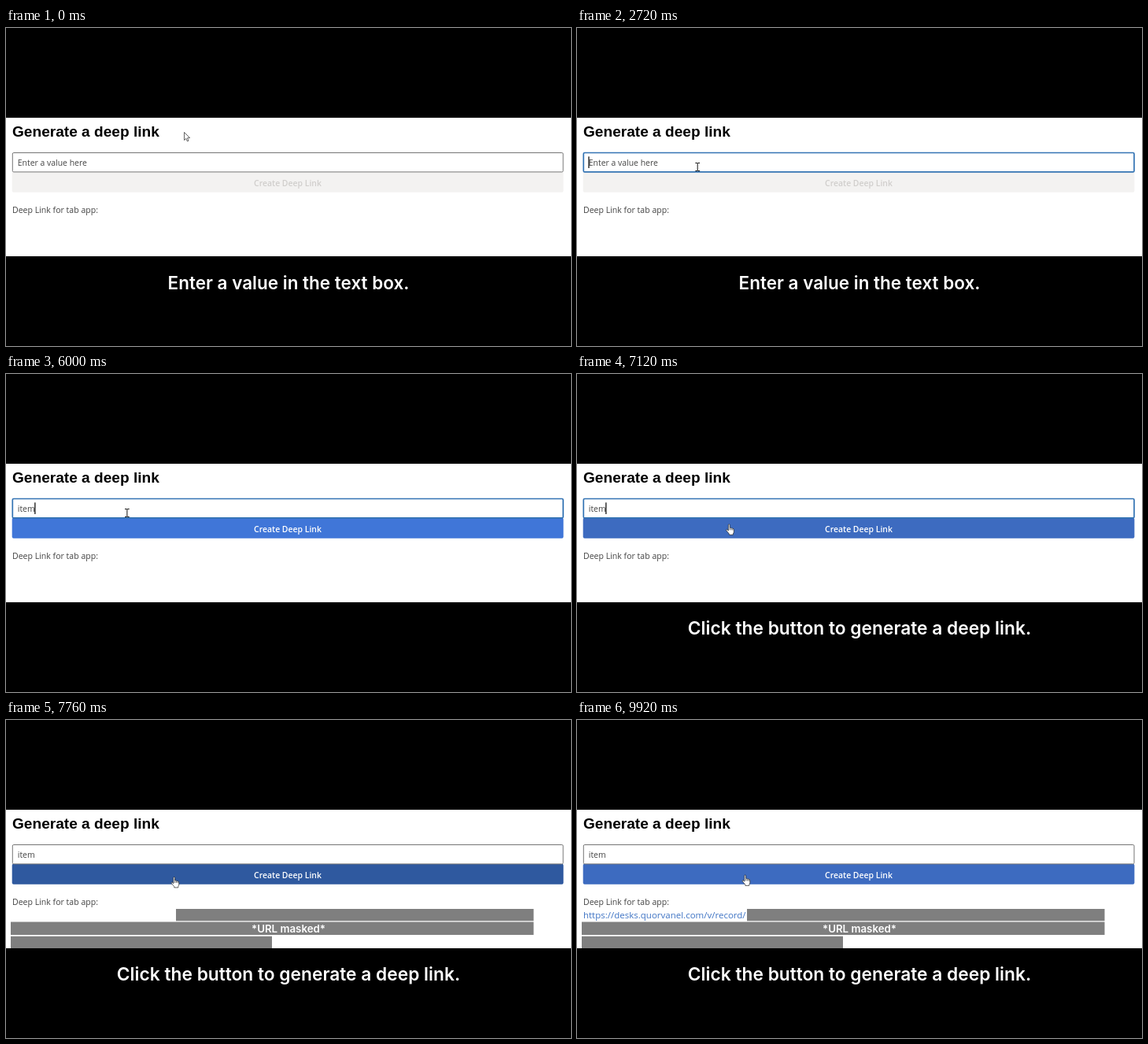
An HTML page that plays this animation: 718 px wide and 404 px high, repeating every 10 s.

```html
<!DOCTYPE html>
<html lang="en">
<head>
<meta charset="utf-8">
<title>Deep link demo</title>
<style>
  html, body { margin: 0; width: 100%; height: 100%; overflow: hidden; background: #000; }
  svg { display: block; width: 718px; height: 404px; }
  text { font-family: "Open Sans", "Noto Sans", sans-serif; font-size: 10.45px; fill: #444; }
  .title { font: bold 19.1px "Liberation Sans", Arial, sans-serif; fill: #000; }
  .caption, .note { font: 600 22.5px Inter, "DejaVu Sans", sans-serif; fill: #fff; text-anchor: middle; }
  .note { font-size: 13.3px; font-feature-settings: "calt" 0; }
  #caption2 { font-size: 22.75px; }
  #label { font-weight: 600; text-anchor: middle; }
  #link { font-size: 11.5px; fill: #3f74c4; }
  #masks { fill: #7f7f7f; }
  .pointer { fill: #fff; stroke: #222; stroke-width: .7; stroke-linejoin: round; }
</style>
</head>
<body>
<svg viewBox="0 0 718 404">
  <rect width="718" height="404"/>
  <rect y="114" width="718" height="176" fill="#fff"/>
  <text class="title" x="8" y="138">Generate a deep link</text>

  <rect id="button" x="7.7" y="182.7" width="700.7" height="26.1" rx="2"/>
  <text id="label" x="358" y="201">Create Deep Link</text>
  <rect id="field" x="8.3" y="158.5" width="699.7" height="24.4" rx="1.5" fill="#fff"/>
  <text id="hint" x="14.8" y="175" fill="#605e5c">Enter a value here</text>
  <text id="value" x="14.8" y="175"></text>
  <rect id="caret" y="163.3" width="1.2" height="14.7"/>

  <text x="8" y="235.3" style="font-size:10.55px">Deep Link for tab app:</text>
  <text id="link" x="8" y="252">https://desks.quorvanel.com/v/record/</text>
  <g id="masks">
    <path d="M216 240h454.5v15.2H216zM6 256.6h664.5v16.5H6zM6 274.7h332V290H6z"/>
    <text class="note" x="359" y="270">*URL masked*</text>
  </g>

  <text id="caption1" class="caption" x="359" y="332">Enter a value in the text box.</text>
  <text id="caption2" class="caption" x="359" y="331">Click the button to generate a deep link.</text>

  <!-- Pointers are drawn around their hot spot -->
  <path id="arrow" class="pointer" d="M.5.5v10l2.3-2.1 1.6 3.5 1.6-.7-1.5-3.4 3.1-.2z"/>
  <path id="beam" fill="none" stroke="#111" d="M-2.8-5h2.3l.5.6.5-.6h2.3M0-4.5v9M-2.8 5h2.3l.5-.6.5.6h2.3"/>
  <path id="hand" class="pointer" d="M-.9 8.2V.9q0-1 .9-1t.9 1v3.7q1.6-.7 2 .4 1.5-.4 1.8.6 1.4-.2 1.4 1v2.8q0 1.6-1 2.7v1.3H.1v-1.2L-3.4 8q-.5-1.2.6-1.5.8-.1 1.9 1.7zM1 5v2.4M2.9 5.4v2M4.6 5.9v1.7"/>
</svg>
<script>
const LOOP = 10000, STEP = 80;
const el = id => document.getElementById(id);
const show = (id, on) => el(id).style.display = on ? "" : "none";
const within = (t, from, to) => t >= from && t < to;

// Pointer hot spot: [time, x, y]
const track = [
  [0, 226, 132], [80, 225.4, 132], [640, 225.4, 132], [1520, 153.2, 176.5],
  [5920, 153.2, 176.5], [6000, 153.9, 176.5], [6480, 153.9, 176.5],
  [7520, 212.6, 198], [7680, 212.8, 198.2], [7760, 213.7, 199.5],
  [8000, 213.7, 197], [LOOP, 213.7, 197]
];

// Times at which each letter of the value appears
const typed = [3360, 3760, 4080, 4160];
const caretOff = [[0, 1920], [2320, 2720], [4560, 5440], [6720, 7120], [7680, LOOP]];

function pointerAt(t) {
  const i = track.findIndex(k => k[0] > t);
  const [t0, x0, y0] = track[i - 1], [t1, x1, y1] = track[i];
  const u = (t - t0) / (t1 - t0), e = u * u * (3 - 2 * u);
  return [x0 + (x1 - x0) * e, y0 + (y1 - y0) * e];
}

function draw(t) {
  const [x, y] = pointerAt(t);
  const kind = y < 158 ? "arrow" : y < 184 ? "beam" : "hand";
  for (const id of ["arrow", "beam", "hand"]) {
    show(id, id === kind);
    el(id).setAttribute("transform", `translate(${x} ${y})`);
  }

  const value = "item".slice(0, typed.filter(k => t >= k).length);
  const focused = within(t, 1920, 7680);
  el("value").textContent = value;
  show("hint", !value);
  el("field").setAttribute("stroke", focused ? "#3474b4" : kind === "beam" ? "#333" : "#757575");
  el("field").setAttribute("stroke-width", focused ? 1.7 : 1);
  const end = value ? el("value").getComputedTextLength() : 0;
  el("caret").setAttribute("x", 14.4 + end);
  show("caret", !caretOff.some(([a, b]) => within(t, a, b)));

  const pressed = within(t, 7680, 7840);
  el("button").setAttribute("fill",
    !value ? "#f3f2f1" : pressed ? "#2f599f" : kind === "hand" ? "#3d6bc0" : "#4076d8");
  el("label").style.fill = value ? "#fff" : "#d0cecc";

  show("masks", t >= 7760);
  show("link", t >= 7840);
  show("caption1", t < 5040);
  show("caption2", t >= 6320);
}

function tick() {
  const t = performance.now() % LOOP;
  draw(Math.floor(t / STEP) * STEP);
  requestAnimationFrame(tick);
}
tick();
</script>
</body>
</html>
```
